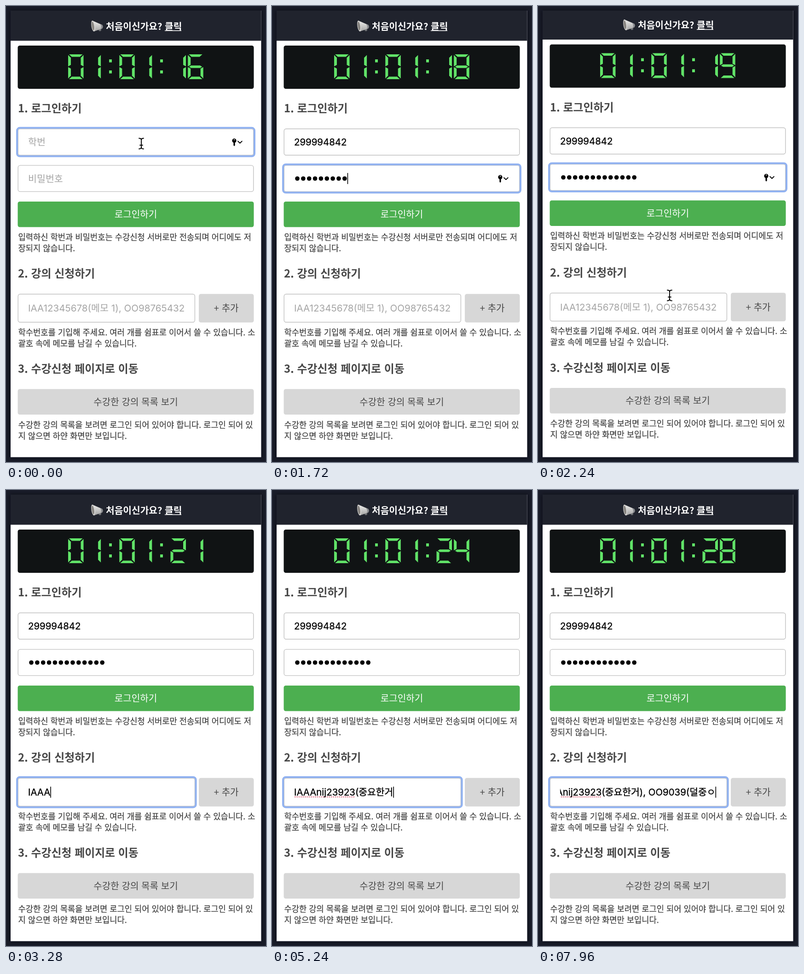
Write an HTML page that moves like this. It is 565x991 px and loops after 8000 ms.

```html
<!DOCTYPE html>
<html lang="ko">
<head>
<meta charset="utf-8">
<title>수강신청</title>
<style>
  html, body { margin: 0; width: 100%; height: 100%; overflow: hidden; background: #161925; }
  svg { display: block; width: 100vw; height: 100vh; }
  text { font-family: "Noto Sans CJK KR", "Noto Sans CJK", sans-serif; white-space: pre; }
  .input { font-family: Inter, "Noto Sans CJK KR", "Noto Sans CJK", sans-serif; }
  .typed { stroke: #000; stroke-width: 0.35; }
  .heading { font-weight: 700; fill: #474747; }
  .note { fill: #404040; stroke: #404040; stroke-width: 0.25; }
</style>
</head>
<body>
<svg id="stage" viewBox="0 0 565 991" preserveAspectRatio="none"></svg>
<script>
const LOOP = 8000;
const stage = document.getElementById('stage');
const $ = id => document.getElementById(id);

// Static drawing helpers
const rect = (x, y, w, h, attrs) => `<rect x="${x}" y="${y}" width="${w}" height="${h}" ${attrs}/>`;
const label = (x, mid, size, str, attrs = '') =>
  `<text x="${x}" y="${mid + size * 0.37}" font-size="${size}" ${attrs}>${str}</text>`;
const heading = (mid, str) => label(26, mid, 23.9, str, 'class="heading"');
const note = (mid, ...lines) =>
  lines.map((str, i) => label(26.5, mid + i * 24, 17.7, str, 'class="note"')).join('');
const button = (x, y, w, h, fill, color, str) =>
  rect(x, y, w, h, `rx="4.5" fill="${fill}"`) +
  label(x + w / 2, y + h / 2, 20.1, str, `text-anchor="middle" fill="${color}"`);

const field = (id, y, w, h, hint, hasKey) => {
  const mid = y + h / 2;
  const key = `<g transform="translate(496 ${mid})">
    <path d="M-1.6 0h3.2v7l-1.6 2-1.6-2z"/><circle cy="-3" r="4.6"/>
    <circle cy="-5" r="1.1" fill="#fff"/>
    <path d="M8-1.8l4.4 4.2 4.4-4.2" fill="none" stroke="#000" stroke-width="1.9"
      stroke-linecap="round" stroke-linejoin="round"/></g>`;
  return rect(26.2, y, w, h, 'rx="4.5" fill="#fff" stroke="#c1c1c1" stroke-width="1.4"') +
    `<g id="${id}-focus">${rect(24, y - 2.2, w + 4.4, h + 4.4,
      'rx="6" fill="none" stroke="#91b2f1" stroke-width="4"')}${hasKey ? key : ''}</g>
    <g clip-path="url(#input-clip)">
      ${label(48, mid, 20.6, hint, `id="${id}-hint" class="input" fill="#a5a5a5"`)}
      <path id="${id}-spell" d="" stroke="#e2647c" stroke-width="1.8" stroke-dasharray="2.4 2"/>
      ${label(48, mid, 20.4, '', `id="${id}-text" class="input typed"`)}
      <g id="${id}-dots"></g>
      ${rect(0, mid - 12, 1.6, 24, `id="${id}-caret"`)}
    </g>`;
};

const megaphone = `<g>
  <path d="M199 48l3 6q3 2 5-1l-1-7z" fill="#6f7175"/>
  <path d="M188 32L209 41q3 4 0 8L192 55z" fill="url(#horn)"/>
  <path d="M205 39.5l4 1.5q3 4 0 8l-3 1q2-5-1-10.5z" fill="#8b8c90"/>
  <ellipse cx="189.5" cy="43.5" rx="4" ry="12" transform="rotate(-9 189.5 43.5)" fill="#d6d5d3"/>
  <ellipse cx="189" cy="43.5" rx="2.5" ry="9.5" transform="rotate(-9 189 43.5)" fill="#85827e"/>
</g>`;

stage.innerHTML = `<defs>
    <clipPath id="panel">${rect(10, 10, 544.5, 970.5, '')}</clipPath>
    <clipPath id="input-clip">${rect(48, 240, 340, 470, '')}</clipPath>
    <filter id="soft"><feGaussianBlur stdDeviation="4"/></filter>
    <linearGradient id="horn" x2="0" y2="1">
      <stop stop-color="#eeeeec"/><stop offset="1" stop-color="#a3a3a3"/>
    </linearGradient>
  </defs>
  ${rect(0, 0, 565, 991, 'fill="#191c29"')}
  ${rect(9, 10, 547, 972, 'fill="#05060b" opacity=".5" filter="url(#soft)"')}
  <g clip-path="url(#panel)">
    ${rect(10, 10, 545, 971, 'fill="#fff"')}
    <g id="page">
      ${rect(10, 0, 545, 75.5, 'fill="#20232d"')}
      ${megaphone}
      ${label(217, 44, 20.3, '처음이신가요? 클릭', 'font-weight="700" fill="#fff"')}
      ${rect(345, 52.8, 36, 1.5, 'fill="#fff"')}
      ${rect(25.5, 86, 513, 94, 'rx="4.5" fill="#101314"')}
      <g id="clock" fill="#61e368"></g>
      ${heading(222.5, '1. 로그인하기')}
      ${field('user', 267, 511.6, 57.3, '학번', true)}
      ${field('pass', 346.4, 511.6, 57, '비밀번호', true)}
      ${button(25.5, 425, 513, 55.5, '#4caf50', '#fff', '로그인하기')}
      ${note(502, '입력하신 학번과 비밀번호는 수강신청 서버로만 전송되며 어디에도 저', '장되지 않습니다.')}
      ${heading(581.5, '2. 강의 신청하기')}
      ${field('course', 626.2, 384.2, 61, 'IAA12345678(메모 1), OO98765432', false)}
      ${button(419, 625.7, 119.5, 62, '#d7d7d7', '#484848', '+ 추가')}
      ${note(709, '학수번호를 기입해 주세요. 여러 개를 쉼표로 이어서 쓸 수 있습니다. 소', '괄호 속에 메모를 남길 수 있습니다.')}
      ${heading(788.5, '3. 수강신청 페이지로 이동')}
      ${button(25.5, 832.5, 513, 55.5, '#d7d7d7', '#484848', '수강한 강의 목록 보기')}
      ${note(910, '수강한 강의 목록을 보려면 로그인 되어 있어야 합니다. 로그인 되어 있', '지 않으면 하얀 화면만 보입니다.')}
    </g>
  </g>
  <g id="mouse" fill="none" stroke-linecap="round">
    ${['#fff" stroke-width="4.4', '#000" stroke-width="1.9'].map(style =>
      `<path stroke="${style}" d="M-5-11.5q5 0 5 3.5q0-3.5 5-3.5M0-8V8M-5 11.5q5 0 5-3.5q0 3.5 5 3.5M-3 3.5h6"/>`).join('')}
  </g>`;

// Seven-segment clock
const SEGMENTS = {
  a: '2 0 31.5 0 25.5 5.6 8 5.6', d: '2 54 31.5 54 25.5 48.4 8 48.4',
  f: '0 1.5 6 7.5 6 23 0 26.3', e: '0 27.7 6 31 6 46.5 0 52.5',
  b: '33.5 1.5 27.5 7.5 27.5 23 33.5 26.3',
  c: '33.5 27.7 27.5 31 27.5 46.5 33.5 52.5',
  g: '2.5 27 7 24.2 26.5 24.2 31 27 26.5 29.8 7 29.8'
};
const DIGITS = ['abcdef', 'bc', 'abged', 'abgcd', 'fgbc', 'afgcd', 'afgedc', 'fabc', 'abcdefg', 'abcdfg'];
const DIGIT_X = [135, 172.6, 246.3, 283.8, 357.5, 395.2];
const colons = [224, 335].map(x => rect(x, 116, 6, 6.5, '') + rect(x, 140, 6, 6.5, '')).join('');

function drawClock(seconds) {
  const digits = '0101' + seconds;
  $('clock').innerHTML = colons + [...digits].map((digit, i) =>
    `<g transform="translate(${DIGIT_X[i]} 105)">${[...DIGITS[digit]].map(s =>
      `<polygon points="${SEGMENTS[s]}"/>`).join('')}</g>`).join('');
}

// Typing: Hangul syllables grow jamo by jamo, as an input method composes them
const LEADS = 'ㄱㄲㄴㄷㄸㄹㅁㅂㅃㅅㅆㅇㅈㅉㅊㅋㅌㅍㅎ';
function forms(ch) {
  const code = ch.charCodeAt(0) - 0xac00;
  if (code < 0 || code > 11171) return [ch];
  const open = String.fromCharCode(0xac00 + code - code % 28);
  return [...new Set([LEADS[Math.floor(code / 588)], open, ch])];
}

function typing(...runs) {
  const steps = [];
  let done = '';
  for (const [start, gap, str] of runs) {
    let at = start;
    for (const ch of str) {
      for (const form of forms(ch)) {
        steps.push({ at, value: done + form });
        at += gap;
      }
      done += ch;
    }
  }
  return steps;
}

const FIELDS = [
  { id: 'user', from: -350, to: 900, steps: typing([80, 90, '299994842']) },
  { id: 'pass', from: 900, to: 2480, masked: true,
    steps: typing([960, 90, '*********'], [1760, 40, '****']) },
  { id: 'course', from: 2480, to: LOOP, steps: typing([2700, 170, 'IAAA'],
    [3400, 100, 'nij23923(중요한거'], [5400, 145, '), OO9039'], [6740, 160, '(덜중ㅇ']) }
];
const BLINK = 350, DOT = 12.85, CARET_MAX = 385.5, SPELL_LENGTH = 12;

function drawField({ id, from, to, masked, steps }, t) {
  const step = steps.filter(s => s.at <= t).pop();
  const value = step ? step.value : '';
  const focused = t >= from && t < to;
  const idle = t - (step ? step.at : from);
  const text = $(id + '-text');
  let width = 0, x = 48;

  if (masked) {
    width = value.length * DOT;
    $(id + '-dots').innerHTML = [...value].map((_, i) =>
      `<circle cx="${55 + i * DOT}" cy="375" r="4.8"/>`).join('');
  } else {
    text.textContent = value;
    width = value ? text.getComputedTextLength() : 0;
    x = Math.min(48, CARET_MAX - width);
    text.setAttribute('x', x);
  }
  const misspelt = id === 'course' && value.length > SPELL_LENGTH;
  $(id + '-spell').setAttribute('d',
    misspelt ? `M${x + 1} 667h${text.getSubStringLength(0, SPELL_LENGTH) - 1}` : '');
  $(id + '-hint').style.display = value ? 'none' : '';
  $(id + '-focus').style.display = focused ? '' : 'none';
  const caret = $(id + '-caret');
  caret.setAttribute('x', x + width);
  caret.style.display = focused && idle % (2 * BLINK) < BLINK ? '' : 'none';
}

// Keyframe rows: [time, value, ...]
function track(rows, t) {
  const next = rows.findIndex(row => row[0] > t);
  if (next === 0) return rows[0].slice(1);
  if (next < 0) return rows[rows.length - 1].slice(1);
  const a = rows[next - 1], b = rows[next];
  const p = (t - a[0]) / (b[0] - a[0]), eased = p * p * (3 - 2 * p);
  return a.slice(1).map((v, i) => v + (b[i + 1] - v) * eased);
}
const MOUSE = [[1960, 294, 299], [2240, 286, 629], [2400, 285, 655]];
const SCROLL = [[2080, 0], [2180, -2.5], [2320, -2.5], [2440, 0]];

let shownSecond;
function render() {
  const t = performance.now() % LOOP;
  const second = Math.floor(16.28 + t * 0.0015);
  if (second !== shownSecond) drawClock(shownSecond = second);
  FIELDS.forEach(f => drawField(f, t));
  $('page').setAttribute('transform', `translate(0 ${track(SCROLL, t)[0]})`);
  $('mouse').setAttribute('transform', `translate(${track(MOUSE, t)})`);
  $('mouse').style.display = t < 80 || (t >= 1960 && t < 2700) ? '' : 'none';
  requestAnimationFrame(render);
}
render();
</script>
</body>
</html>
```
